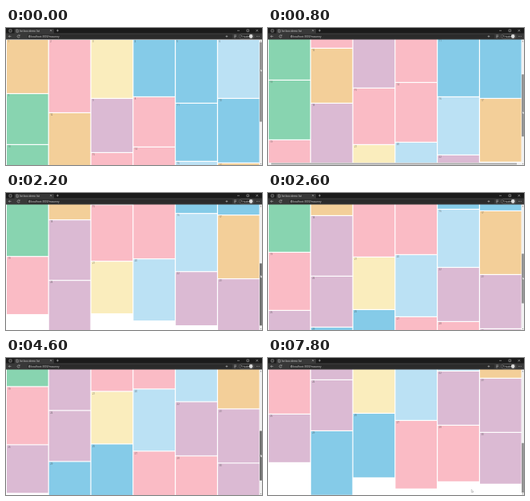
Animation, 320 px wide and 172 px high, one loop 8 s. Source, as an HTML page:

```html
<!DOCTYPE html>
<html lang="en">
<head>
<meta charset="utf-8">
<title>Masonry scroll</title>
<style>
  html, body { margin: 0; width: 100%; height: 100%; overflow: hidden; background: #fff; }
  svg { display: block; width: 100%; height: 100%; }
  text { font-family: "Open Sans", Arial, sans-serif; }
  .label { font-size: 2.8px; fill: #444; fill-opacity: .75; }
  .ui { font-size: 3.2px; fill: #d8d8d8; }
  .icon { fill: none; stroke: #c8c8c8; stroke-width: .5; }
</style>
</head>
<body>
<svg viewBox="0 0 320 172" preserveAspectRatio="none">
  <clipPath id="view"><rect y="14" width="317" height="158"/></clipPath>
  <rect width="320" height="172" fill="#fff"/>
  <g clip-path="url(#view)"><g id="page"></g></g>

  <g id="hbar">
    <rect y="169" width="317" height="3" fill="#f1f1f1"/>
    <rect x="4" y="169.6" width="307" height="1.8" fill="#a5a5a5"/>
  </g>
  <rect x="317" y="14" width="3" height="158" fill="#f1f1f1"/>
  <path d="M317.6 17.2l.9-1.2.9 1.2zM317.6 169.9l.9 1.2.9-1.2z" fill="#777"/>
  <rect id="thumb" x="317.2" width="2.6"/>

  <rect width="320" height="7" fill="#1b1b1b"/>
  <rect y="6.5" width="320" height="8" fill="#383838"/>
  <path d="M10.5 7V2q0-1 1-1H59q1 0 1 1v5z" fill="#383838"/>
  <rect x="27" y="7.9" width="256" height="5.4" rx="1" fill="#2b2b2b"/>
  <path class="icon" d="M4 2h3v3h-3zM13 2h1.5l.8.8v2.4h-2.3zM55.2 2.2l2 2m0-2l-2 2M63 3.2h3m-1.5-1.5v3
    M289 3.3h3M301 2h2.6v2.6h-2.6zM312.5 2l2.6 2.6m0-2.6l-2.6 2.6
    M6.5 10.5h-3.2l1.4-1.4m-1.4 1.4l1.4 1.4M17 9.6a1.6 1.6 0 1 0 .2 1.4M17.2 8.4v1.4h-1.4
    M28.6 10.2h1.6v1.5h-1.6zM28.9 10.2v-.8h1v.8M274.5 10.5h2.8m-1.4-1.4v2.8M285 9h3m-3 1.5h3m-3 1.5h2"/>
  <text class="ui" x="17" y="4.7">list box demo list</text>
  <text class="ui" x="31" y="11.8">localhost:3000/masonry</text>
  <rect x="291.8" y="7.8" width="18" height="5.5" rx="2.7" fill="#222" stroke="#999" stroke-width=".4"/>
  <text class="ui" x="293.6" y="11.6">Private</text>
  <circle cx="306.2" cy="10.5" r="2.4" fill="#dcdcdc"/>
  <path d="M313.2 10.5h.6m.8 0h.6m.8 0h.6" stroke="#ccc" stroke-width=".7"/>

  <path id="cursor" d="M0 0v3.6l.9-.8.6 1.3.7-.3-.6-1.2h1.1z" fill="#fff" stroke="#666" stroke-width=".3"/>
</svg>
<script>
const DURATION = 8000, STEP = 200;
const TOP = 15, VIEW = 157, TRACK = 151;
const COLUMNS = 6, PITCH = 52.8, GAP = 1.2;
const colors = {
  o: '#f3cf99', g: '#88d4b0', p: '#fabbc5', y: '#faedbd',
  v: '#dbbad3', b: '#85cbe8', l: '#bbe1f4'
};

// Page content in reading order: colour and height (gap included) of each card.
const palette = 'opybbl gpvbbo gpplov plyvvv bvppbv'.replaceAll(' ', '');
const heights = [
  68, 92, 74, 72, 80, 74,
  64, 63, 68, 81, 73, 69,
  75, 75, 71, 73, 80, 76,
  73, 78, 66, 68, 68, 64,
  81, 61, 86, 71, 81, 65
];
const $ = id => document.getElementById(id);

// Masonry: every card goes into the shortest column.
const ends = Array(COLUMNS).fill(TOP);
heights.forEach((height, i) => {
  const top = Math.min(...ends);
  const col = ends.indexOf(top);
  ends[col] += height;
  $('page').insertAdjacentHTML('beforeend',
    `<g transform="translate(${1 + PITCH * col} ${top})">
     <rect width="${PITCH - GAP}" height="${height - GAP}" fill="${colors[palette[i]]}"/>
     <text class="label" x="1.4" y="3">${i + 1}</text></g>`);
});
const cards = [...$('page').children];

// Quadratic ease-in-out from 0 to 1 between two times
function ease(t, from, to) {
  const f = Math.min(1, Math.max(0, (t - from) / (to - from)));
  return f < .5 ? 2 * f * f : 1 - 2 * (1 - f) ** 2;
}

function render(t) {
  // Three drags of the scrollbar; the first two end by loading another row.
  const drags = [ease(t, 0, 800), ease(t, 1400, 2400), ease(t, 4000, 5200)];
  const [first, second, third] = drags;
  const scroll = 81 * first + 66 * second + 77 * third;
  const rows = t < 800 ? 3 : t < 2400 ? 4 : 5;
  const maxScroll = [81, 147, 224][rows - 3];

  $('page').setAttribute('transform', `translate(0 ${-scroll})`);
  cards.forEach((card, i) => card.style.display = i < rows * COLUMNS ? '' : 'none');
  $('hbar').style.display = t === 800 || t === 2400 ? '' : 'none';

  const size = TRACK * VIEW / (VIEW + maxScroll);
  const dragging = drags.some(d => d > 0 && d < 1);
  $('thumb').setAttribute('y', 18 + (TRACK - size) * scroll / maxScroll);
  $('thumb').setAttribute('height', size);
  $('thumb').setAttribute('fill', dragging ? '#666' : '#8a8a8a');

  const regrab = ease(t, 1000, 1400);
  const leave = ease(t, 5200, 5600), rest = ease(t, 6400, 7400);
  const x = 318.2 - 34 * leave - 30 * rest;
  const y = 51.5 + 53 * first - 30 * regrab + 31 * (second + third) - 68.5 * leave + 97 * rest;
  $('cursor').setAttribute('transform', `translate(${x} ${y})`);
}

const start = performance.now();
function tick() {
  const t = (performance.now() - start) % DURATION;
  render(Math.floor(t / STEP) * STEP);
  requestAnimationFrame(tick);
}
tick();
</script>
</body>
</html>
```
